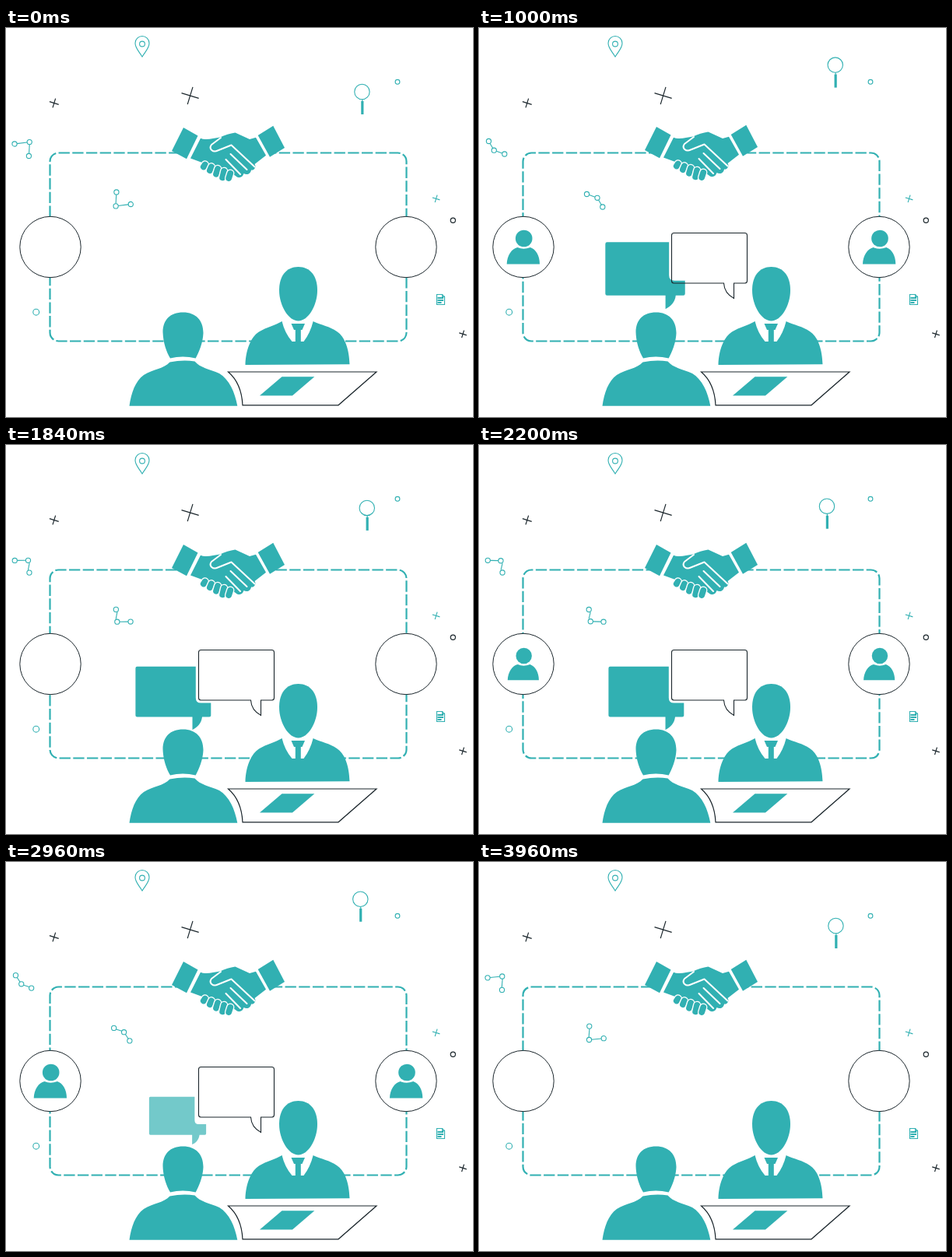
These frames come from a looping animation (600x500 px, 4 s). An HTML page:

```html
<!DOCTYPE html>
<html lang="en">
<head>
<meta charset="utf-8">
<title>Agreement</title>
<style>
html, body { margin: 0; width: 100%; height: 100%; overflow: hidden; background: #fff; }
svg { display: block; width: 100vw; height: 100vh; }
.fill { fill: #31b0b2; }
.teal { fill: none; stroke: #31b0b2; }
.dark { fill: none; stroke: #1b262c; }
.white { fill: none; stroke: #fff; stroke-width: 2; stroke-linecap: round; stroke-linejoin: round; }
.plus { vector-effect: non-scaling-stroke; }
</style>
</head>
<body>
<svg viewBox="0 0 600 500">
  <defs>
    <path id="plus" class="plus" d="M-1 0H1M0-1V1"/>
    <g id="person" class="fill">
      <circle cx=".7" cy="-11" r="10.8"/>
      <path d="M-21.3 22C-21 11-15 2-7.5 .5Q0 4 9 .5C16 3 21 11 21 22Z"/>
    </g>
  </defs>

  <rect id="track" class="teal" x="56.5" y="160.5" width="458" height="242" rx="11"
    stroke-width="2.2" pathLength="78" stroke-dasharray=".81 .19"/>

  <g class="dark" style="fill:#fff">
    <circle cx="57" cy="281.5" r="39.2"/>
    <circle cx="514" cy="281.5" r="39.2"/>
  </g>
  <use class="avatar" href="#person" data-x="57"/>
  <use class="avatar" href="#person" data-x="514.3"/>

  <!-- decorations -->
  <g class="teal" stroke-width="1.1">
    <path d="M175 37C171 30 166 26 166 19.5A9 9 0 0 1 184 19.5C184 26 179 30 175 37Z"/>
    <circle cx="175" cy="20.5" r="3.4"/>
    <circle cx="503" cy="69.3" r="2.9"/>
    <circle cx="38.7" cy="365.2" r="3.9"/>
    <path d="M553.5 342.5H560.5L563.5 345.5V355.5H553.5ZM560.5 342.5V345.5H563.5"/>
    <path d="M554.5 347H562M554.5 350H562M554.5 353H559.5" stroke-width="1.8"/>
    <use href="#plus" transform="translate(552.6 219.4) rotate(17) scale(5)"/>
  </g>
  <g class="dark" stroke-width="1.2">
    <use href="#plus" transform="translate(61.8 96.5) rotate(17) scale(6.2)"/>
    <use href="#plus" transform="translate(236.6 87) rotate(17) scale(11.6)"/>
    <use href="#plus" transform="translate(587 393.4) rotate(17) scale(5)"/>
    <circle cx="574.3" cy="247.2" r="3.1"/>
  </g>
  <g id="lens" class="teal" stroke-width="1.1">
    <circle r="9.7"/>
    <path d="M.4 9.7V13"/>
    <path d="M.4 12V29" stroke-width="3.2"/>
  </g>
  <g id="molecule" class="teal" stroke-width="1.1"></g>
  <use href="#molecule" transform="translate(171.3 375.5) rotate(180)"/>

  <!-- two people at the desk -->
  <g class="fill">
    <path d="M201.5 391C201.5 375 211 365.5 227.5 365.5S253.5 376 253.5 392C253 405 248 416 243.7 424.5Q227 420.5 211 424.5C206 416 202 405 201.5 391Z"/>
    <path d="M158.5 485.8C161 469 166 454 177 446C189 438.5 202 438.5 210.5 429.5Q227 426.2 242.5 428.5C250 437.5 264 439 274 444C287 452 294 468 297.3 485.8Z"/>
    <path d="M307.5 433C308 415 314 397.5 325 390.5C335 384.5 346 382 354.5 377H394.5C405 382 416 383.5 425 390C436 397 441 414 441.5 432.3Z"/>
    <path d="M354.5 376.8Q358 392 367.5 403H382.5Q391 392 394.7 376.8Z" fill="#fff"/>
    <path d="M351 337C351 319 360 307 375.5 307S400 319 400 337C400 357 388 376.5 375.5 376.5S351 357 351 337Z"/>
    <path d="M366.5 380H384L380.5 388H378.8V403.5H371.8V388H370Z"/>
  </g>
  <path class="dark" stroke-width="1.2" style="fill:#fff" d="M285.5 442H476L427 484.8H304C303 464 296 451 285.5 442Z"/>
  <path class="fill" d="M354.5 448.2H396.3L368 472.5H326Z"/>

  <!-- speech -->
  <path id="left" class="fill" d="M168.5 284.8H243.8V325Q243.8 331.6 250.4 331.6H263.3V347.5Q263.3 349.6 261.2 349.6H252C251 358 246 363 239.5 366V349.6H168.5Q166.4 349.6 166.4 347.5V287Q166.4 284.8 168.5 284.8Z"/>
  <path id="right" class="dark" stroke-width="1.1" d="M250.5 263.5H341.5Q344.5 263.5 344.5 266.5V325Q344.5 328 341.5 328H327.5V347.5C319 343 315 337 314.5 328H250.5Q247.5 328 247.5 325V266.5Q247.5 263.5 250.5 263.5Z"/>

  <!-- handshake -->
  <g id="shake">
    <path d="M240 134L254 141L320 140L328 136L345 162L300 170L230 168Z" fill="#fff"/>
    <g class="fill">
      <path d="M228 127.5L246.5 138L232 167.7L213 157.5Z"/>
      <path d="M323.7 137.5L343.3 125.3L358 153.5L339 165.3Z"/>
      <path d="M250 141.2C258 144.5 266 141 275 140C281 137 288 135 294.5 134L313 142.5L321 140.2L334 163.3L319.5 174.5C322 178 319 183 315 182C314.5 187 309.5 189 305.5 186.5C304 192 298.5 193 295.5 190L287 184L262 174L252 172.5L237 167Z"/>
    </g>
    <path class="white" d="M276 140.5L264 149.5C260 155 266 160 272 157L289.5 150L319.5 178M288.5 161.5L309.5 181.5M282.5 168.5L301 187.5"/>
    <g id="fingers" stroke-linecap="round"></g>
  </g>
</svg>
<script>
const LOOP = 4000, HALF = 2000;
const $ = id => document.getElementById(id);
const clamp = v => Math.max(0, Math.min(1, v));
const span = (t, a, b) => clamp((t - a) / (b - a));
const smooth = k => k * k * (3 - 2 * k);
const out = k => 1 - (1 - k) ** 3;
const mix = (a, b, k) => a + (b - a) * k;
const place = (el, x, y, s = 1) => el.setAttribute('transform', `translate(${x} ${y}) scale(${s})`);

function finger(i) {
  const x = 255.8 + 8.1 * i, top = 175 + 2.8 * i, bottom = Math.min(178 + 4.6 * i, 192.5);
  const line = (color, width) =>
    `<path d="M${x} ${top}L${x - 2} ${bottom}" stroke="${color}" stroke-width="${width}"/>`;
  return line('#fff', 10.5) + line('#31b0b2', 7.8);
}
$('fingers').innerHTML = [0, 1, 2, 3, 4].map(finger).join('');

// two links between three nodes; the second link swaps its ends on the way
function drawMolecule(k) {
  const r = 3.1;
  const at = (x, y, u, v) => [mix(x, u, k), mix(y, v, k)];
  const a = at(11, 149, 12.5, 145.5);
  const b = at(30.2, 146.6, 19.3, 157.2);
  const c = at(29.4, 164.5, 32.8, 162);
  const gap = r / Math.hypot(b[0] - a[0], b[1] - a[1]);
  const on = f => [mix(a[0], b[0], f), mix(a[1], b[1], f)];
  const line = (p, q) => `<path d="M${p}L${q}"/>`;
  $('molecule').innerHTML =
    line(on(gap), on(1 - gap)) +
    line(at(30.2, 149.8, 29.8, 161), at(29.6, 161.3, 22.3, 158.2)) +
    [a, b, c].map(([x, y]) => `<circle cx="${x}" cy="${y}" r="${r}"/>`).join('');
}

// pops up with an overshoot, then shrinks and fades towards its tail
function bubble(el, t, start, end, x, y) {
  const grow = out(span(t, start, start + 240)) + 0.057 * Math.sin(Math.PI * span(t, start + 60, start + 420));
  const leave = span(t, end, end + 500);
  const s = grow * (1 - smooth(leave));
  const lift = Math.max(0, s - 1) * 97;
  el.setAttribute('transform', `translate(${x} ${y - lift}) scale(${s}) translate(${-x} ${-y})`);
  el.setAttribute('opacity', 1 - leave);
  el.style.display = s > 0.01 ? '' : 'none';
}

const avatars = document.querySelectorAll('.avatar');
const bump = (t, c) => smooth(clamp(1 - Math.abs(t - c) / 300));

function draw(t) {
  const p = t % HALF, turn = 2 * Math.PI * p / HALF;

  $('track').setAttribute('stroke-dashoffset', -6 * t / LOOP);

  const a = turn + 0.2 * Math.sqrt(Math.max(0, -Math.sin(turn)));
  place($('lens'), 457.5 - 17.8 * Math.sin(a), 64.8 + 17.2 * Math.cos(a));

  drawMolecule(1 - Math.abs(1 - 2 * p / HALF));

  const size = out(span(p, 0, 320)) * (1 - smooth(span(p, 1240, 1620)));
  for (const el of avatars) {
    place(el, el.dataset.x, 281.5, size);
    el.style.display = size > 0.01 ? '' : 'none';
  }

  bubble($('right'), t, 560, 3040, 327, 348);
  bubble($('left'), t, 760, 2800, 238, 354);
  place($('shake'), 0, 0.5 - bump(t, 1000) - bump(t, 2600));
}

const begin = performance.now();
function tick() {
  draw((performance.now() - begin) % LOOP);
  requestAnimationFrame(tick);
}
draw(0);
requestAnimationFrame(tick);
</script>
</body>
</html>
```
